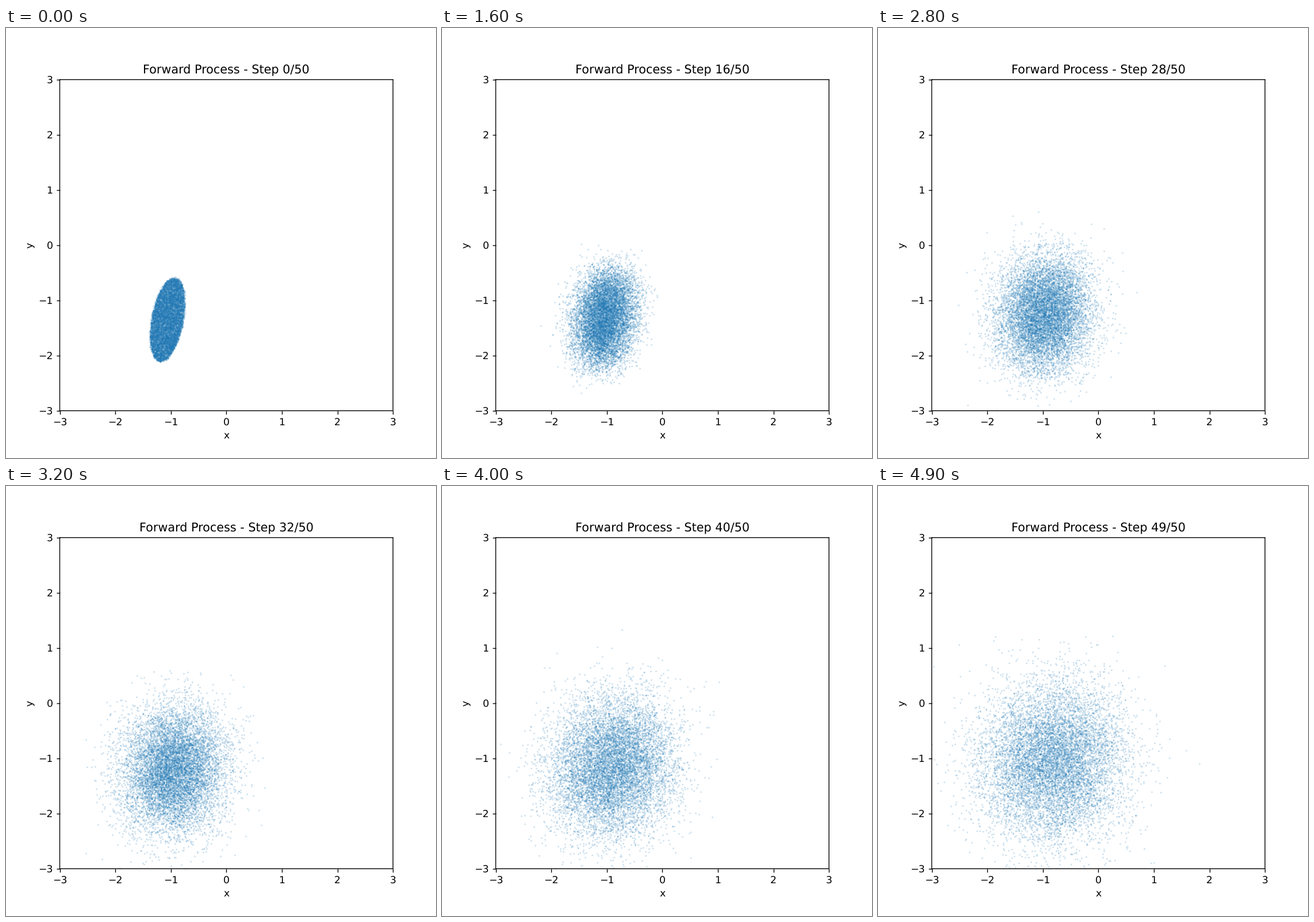
These frames come from a looping animation (748x748 px, 5000 ms). A matplotlib script:

```python
import numpy as np
import matplotlib.pyplot as plt
from matplotlib.animation import FuncAnimation

STEPS = 50
COUNT = 10000
INCHES = 6
CENTER = np.array([-1.065, -1.347])
SHAPE = np.array([[0.098, 0.094], [0.094, 0.578]])

# Unsnapped lines and unhinted text keep their true fractional positions.
plt.rcParams.update({
    "font.family": "DejaVu Sans",
    "path.snap": False,
    "text.hinting": "none",
})

betas = np.linspace(1e-4, 0.02, STEPS)
alpha_bars = np.cumprod(1 - betas)


def filled_ellipse(rng):
    """Points spread evenly inside the ellipse given by CENTER and SHAPE."""
    radius = np.sqrt(rng.random(COUNT))
    angle = rng.uniform(0, 2 * np.pi, COUNT)
    disc = radius * np.array([np.cos(angle), np.sin(angle)])
    return CENTER + (np.linalg.cholesky(SHAPE) @ disc).T


def diffused(step):
    """Starting points after noise with the variance of this step."""
    noise = np.random.default_rng(100 + step).standard_normal(start.shape)
    keep = alpha_bars[step]
    return np.sqrt(keep) * start + np.sqrt(1 - keep) * noise


start = filled_ellipse(np.random.default_rng(7))

fig, ax = plt.subplots(figsize=(INCHES, INCHES), dpi=748 / INCHES)
ax.set(xlim=(-3, 3), ylim=(-3, 3), xlabel="x", ylabel="y")
ax.set_xticks(range(-3, 4))
ax.set_yticks(range(-3, 4))
dots = ax.scatter(*start.T, s=3, alpha=0.2, color="tab:blue", linewidths=0)


def draw(step):
    dots.set_offsets(diffused(step))
    ax.set_title(f"Forward Process - Step {step}/{STEPS}")
    return (dots,)


animation = FuncAnimation(fig, draw, frames=STEPS, interval=100, repeat=True)
plt.show()
```
